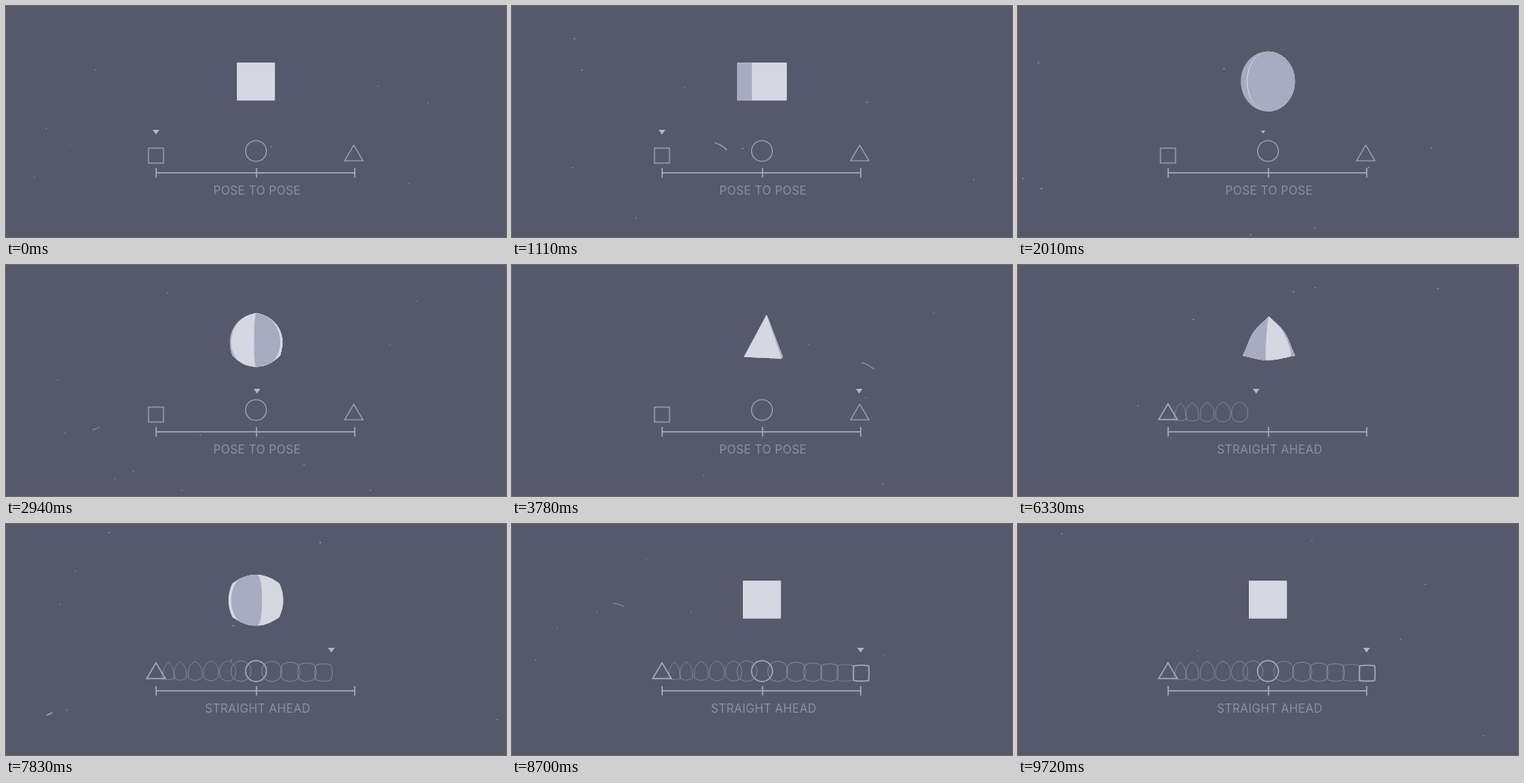
Recreate the animation shown at these times as an HTML page. Size 600x278 px, loop 9.78 s.

```html
<!DOCTYPE html>
<html lang="en">
<head>
<meta charset="utf-8">
<title>Pose to pose, straight ahead</title>
<style>
html, body { margin: 0; width: 100%; height: 100%; overflow: hidden; background: #56596b; }
svg { display: block; width: 100%; height: 100%; }
text { font: 400 14px Inter, sans-serif; letter-spacing: .3px; text-anchor: middle; fill: #8d90a6; }
.line { fill: none; stroke: #a8aabf; }
</style>
</head>
<body>
<svg viewBox="0 0 600 278">
  <defs><clipPath id="clip"><path id="hull"/></clipPath></defs>
  <rect width="600" height="278" fill="#56596b"/>
  <path id="dust" fill="none" stroke="#c3c5d3" stroke-width="1.1" stroke-linecap="round"/>
  <g id="solid"><g id="faces" clip-path="url(#clip)"></g></g>
  <path class="line" stroke-width="1.5" d="M180 200.7H418.7M180.2 195v11.5M300.6 195v11.5M418.5 195v11.5"/>
  <g id="poses" class="line" stroke-width="1.1">
    <rect x="171" y="171" width="18" height="18"/>
    <circle cx="300" cy="174.5" r="12.5"/>
    <path d="M417.3 167.5L428.3 186.2H406.3Z"/>
    <text x="301.3" y="226.5" stroke="none">POSE TO POSE</text>
  </g>
  <g id="ahead">
    <g id="steps" class="line"></g>
    <text x="302" y="226.5">STRAIGHT AHEAD</text>
  </g>
  <path id="pointer" fill="#b4b6c8" d="M-4-2.8H4L0 3Z"/>
  <path id="spark" fill="none" stroke="#f0f1f6" stroke-width="1.8" stroke-linejoin="round" pathLength="1"
    d="M188 131.5L184 133L178.5 138L178 150L183 153L190 156L198 156.5L205 155"/>
</svg>
<script>
const LOOP = 9780, STEP = 30, LIGHT = '#d6d8e1', MID = '#a9abc0';
const $ = id => document.getElementById(id);
const clamp = (v, a = 0, b = 1) => Math.min(b, Math.max(a, v));
const mix = (a, b, u) => a + (b - a) * u;
const smooth = u => u * u * (3 - 2 * u);
const cubic = u => u < .5 ? 4 * u ** 3 : 1 - 4 * (1 - u) ** 3;
const span = (t, a, b) => clamp((t - a) / (b - a));

function add(parent, tag) {
  const el = document.createElementNS('http://www.w3.org/2000/svg', tag);
  return parent.appendChild(el);
}

// Value at t from [time, value] pairs
function track(keys, t, ease = smooth) {
  let i = 1;
  while (i < keys.length - 1 && t > keys[i][0]) i++;
  const [a, va] = keys[i - 1], [b, vb] = keys[i];
  return mix(va, vb, ease(span(t, a, b)));
}

const YAW = [[0, -45], [700, -45], [2010, 30], [3780, 133], [4400, 140], [5400, 278],
  [6330, 351], [7830, 555], [8700, 675], [LOOP, 675]];
const ROUND = [[0, 0], [1250, 0], [2000, 1], [2750, 1], [3550, 0], [6030, 0],
  [6890, 1], [7560, 1], [8380, 0], [LOOP, 0]];
const STRETCH = [[0, 0], [1300, 0], [2010, .08], [2700, 0], [5700, 0], [6330, -.07], [7100, 0], [LOOP, 0]];
const SPREAD = [[0, 0], [1300, 0], [1950, 72], [2150, 72], [2700, 0], [LOOP, 0]];
const LEAN = [[0, 0], [3000, 0], [3780, 4], [4700, 0], [LOOP, 0]];

// Distance from the centre to a convex polygon's border along an angle
function reach(poly, angle) {
  const ux = Math.cos(angle), uy = Math.sin(angle);
  let best = 1e3;
  poly.forEach(([x, y], i) => {
    const [p, q] = poly[(i + 1) % poly.length];
    const nx = q - y, ny = x - p, d = nx * ux + ny * uy;
    if (d > 1e-6) best = Math.min(best, (nx * x + ny * y) / d);
  });
  return best;
}

// Polygon (clockwise) blended towards a circle
function outline(poly, radius, round) {
  const angles = poly.map(([x, y]) => Math.atan2(y, x));
  for (let i = 0; i < 90; i++) angles.push((i / 45 - 1) * Math.PI);
  angles.sort((a, b) => a - b);
  const pts = angles.map(a => {
    const d = mix(reach(poly, a), radius, round);
    return (d * Math.cos(a)).toFixed(2) + ' ' + (d * Math.sin(a)).toFixed(2);
  });
  return 'M' + pts.join('L') + 'Z';
}

const box = (w, h) => [[-w, -h], [w, -h], [w, h], [-w, h]];
const bands = Array.from({ length: 6 }, () => add($('faces'), 'path'));

function drawSolid(t) {
  const yaw = track(YAW, t, u => u), r = track(ROUND, t), s = track(STRETCH, t);
  const spread = track(SPREAD, t), lean = track(LEAN, t);
  const pyramid = t > 2375 && t < 7200;
  const k = Math.round(yaw / 90), phi = (yaw - 90 * k) * Math.PI / 180;
  const w = 32 * Math.cos(phi), m = 32 * Math.sin(phi);
  const poly = pyramid
    ? [[lean, -31], [w, 19.5], [clamp(m, -w + .5, w - .5), 22], [-w, 19.8]]
    : box(w, 22.6);
  $('hull').setAttribute('d', outline(poly, 33.4, r));

  bands[0].setAttribute('d', 'M-90-60H90V60H-90Z');
  bands[0].setAttribute('fill', k % 2 ? LIGHT : MID);
  for (let n = 1; n < 6; n++) {
    const j = k + 3 - n;
    const e = (yaw - 90 * j) * (1 - r / 6) + (j % 2 ? 0 : spread);
    const x = Math.abs(e) >= 89 ? Math.sign(e) * 90 : 32.6 * Math.sin(e * Math.PI / 180);
    const pts = [];
    for (let i = 0; i <= 20; i++) {
      const v = i / 20, ball = Math.abs(x) === 90 ? 1 : Math.sqrt(1 - (2 * v - 1) ** 2);
      const width = mix(pyramid ? (Math.abs(x) === 90 ? 1 : v) : 1, ball, r);
      const y = mix(pyramid ? mix(-31, 22, v) : mix(-23, 23, v), mix(-33.4, 33.4, v), r);
      const shift = pyramid ? lean * (1 - v) * (1 - r) : 0;
      pts.push((x * width + shift).toFixed(2) + ' ' + y.toFixed(2));
    }
    const [top] = pts[0].split(' '), [end] = pts[20].split(' ');
    bands[n].setAttribute('d', `M${top} -60L${pts.join('L')}L${end} 60H95V-60Z`);
    bands[n].setAttribute('fill', (j - 1) % 2 ? LIGHT : MID);
  }
  const cx = pyramid ? mix(301.5, 300, r) : 299.8;
  const cy = t > 5400 ? mix(91, 92, r) : 90.8;
  $('solid').setAttribute('transform', `translate(${cx} ${cy}) scale(${1 - s * .35} ${1 + s})`);
}

const STEPS = [180, 195, 209, 227, 246, 266, 282, 300, 319, 341, 361, 381, 400, 419];
const steps = STEPS.map((x, i) => {
  const el = add($('steps'), 'path'), round = 1 - Math.abs(i - 7) / 7;
  const sx = i && i < 6 ? .7 + i * .03 : 1;
  const poly = i < 7 ? [[0, -10], [11.2, 9], [-11.2, 9]] : box(9, 9);
  const cy = i < 7 ? 177 : mix(180, 177, round);
  const key = i % 7 === 0 || i === 13;
  el.setAttribute('d', outline(poly, 12.5, i < 7 ? Math.sqrt(round) : round));
  el.setAttribute('transform', `translate(${x} ${cy}) scale(${sx} 1)`);
  el.setAttribute('stroke-width', key ? 1.5 : .9);
  el.setAttribute('opacity', key ? 1 : i === 12 ? .5 : .65);
  return el;
});

function pointerX(t) {
  const [a, b] = t < 4900 ? [1104, 2780] : [5516, 7110];
  return 180 + 120 * cubic(span(t, a, a + 1180)) + 118.3 * cubic(span(t, b, b + 1180));
}

function drawTimeline(t) {
  const swap = smooth(span(t, 4560, 4800)), x = pointerX(t);
  $('poses').setAttribute('opacity', 1 - swap);
  $('ahead').setAttribute('opacity', swap);
  steps.forEach((el, i) => {
    const on = !i || x >= Math.min(STEPS[i] + 5, 418);
    el.setAttribute('visibility', on ? 'visible' : 'hidden');
  });
  steps[0].setAttribute('stroke-width', t < 5500 ? 1 : 1.5);

  const dip = 1 - .36 * clamp(1 - Math.abs(t - 2010) / 150);
  $('pointer').setAttribute('transform', `translate(${x} 151.8) scale(${dip})`);
  $('pointer').setAttribute('opacity', t < 4900 ? 1 - swap : t < 5490 ? 0 : 1);

  const grow = span(t, 5280, 5400), fade = span(t, 5410, 5510);
  $('spark').setAttribute('stroke-dasharray', `${grow - fade} 2`);
  $('spark').setAttribute('stroke-dashoffset', -fade);
  $('spark').setAttribute('visibility', grow > 0 && fade < 1 ? 'visible' : 'hidden');
}

function random(seed) {
  return () => {
    seed = (seed + 0x6D2B79F5) | 0;
    let v = Math.imul(seed ^ seed >>> 15, 1 | seed);
    v ^= v + Math.imul(v ^ v >>> 7, 61 | v);
    return ((v ^ v >>> 14) >>> 0) / 4294967296;
  };
}

// Film dust, reshuffled on every step
function drawDust(t) {
  const rnd = random(Math.floor(t / STEP) * 7919 + 11);
  let d = '';
  for (let n = 4 + Math.floor(rnd() * 9); n > 0; n--) {
    const x = rnd() * 600, y = rnd() * 278, long = rnd() < .08;
    const len = long ? 6 + rnd() * 12 : rnd() * .8, a = (rnd() - .5) * 1.2;
    const dx = len * Math.cos(a), dy = len * Math.sin(a);
    d += `M${x.toFixed(1)} ${y.toFixed(1)}q${(dx / 2).toFixed(1)} ${(dy * .2).toFixed(1)} ${(dx + .05).toFixed(2)} ${dy.toFixed(2)}`;
  }
  $('dust').setAttribute('d', d);
  $('dust').setAttribute('opacity', .5 + rnd() * .35);
}

const start = performance.now();
function frame() {
  const t = Math.max(0, performance.now() - start) % LOOP;
  drawSolid(t);
  drawTimeline(t);
  drawDust(t);
  requestAnimationFrame(frame);
}
frame();
</script>
</body>
</html>
```
